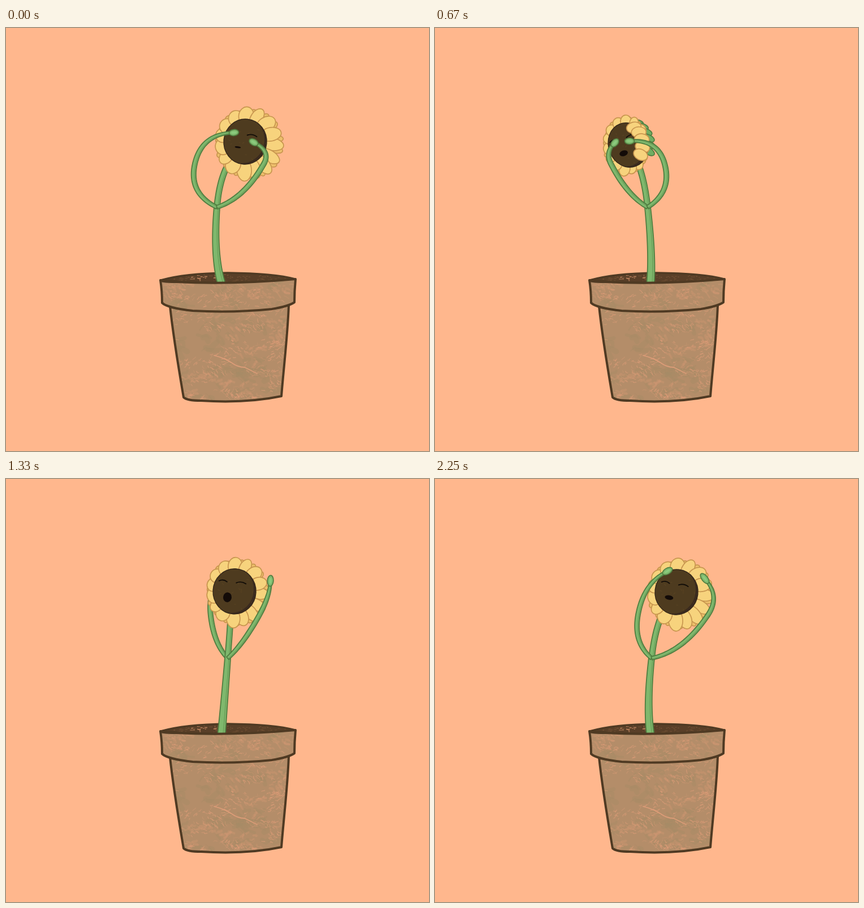
Animation of 748 by 748 pixels, one loop 2.33 s. Source, as an HTML page with a canvas:

```html
<!DOCTYPE html>
<html lang="en">
<head>
<meta charset="utf-8">
<title>Sleepy sunflower</title>
<style>
  html, body { margin: 0; width: 100%; height: 100%; overflow: hidden; background: #ffb78d; }
  canvas { display: block; width: 100vw; height: 100vh; }
</style>
</head>
<body>
<canvas id="stage" width="748" height="748"></canvas>
<script>
const SIZE = 748, LOOP = 2330, FRAMES = 28, DRAWINGS = 25;
const TAU = Math.PI * 2, RAD = Math.PI / 180;
const BASE = [381, 452], JOINT_Y = 317, ELBOW_Y = 240;
const INK = '#4f3a23', GREEN = '#7fb86d', GREEN_INK = '#507d40', PETAL_INK = '#c8964f';
const ctx = document.getElementById('stage').getContext('2d');

// An arm is elbow x, hand x, hand y; everything else follows from these points.
const poses = [
  { at: 0, joint: 373, head: [423, 201], mouth: 1.6, left: [334, 403, 185], right: [456, 438, 202] },
  { at: 5, joint: 378, head: [385, 194], mouth: 4, left: [328, 362, 188], right: [439, 398, 196] },
  { at: 8, joint: 376, head: [341, 207], mouth: 5, left: [311, 318, 203], right: [406, 344, 200] },
  { at: 13, joint: 385, head: [372, 197], mouth: 7, left: [335, 342, 161], right: [416, 394, 162] },
  { at: 18, joint: 405, head: [463, 202], mouth: 12, left: [411, 440, 205], right: [508, 603, 213] },
  { at: 21, joint: 407, head: [455, 199], mouth: 10.5, left: [400, 441, 159], right: [505, 589, 194] },
  { at: 24, joint: 383, head: [427, 200], mouth: 4, left: [359, 411, 163], right: [483, 477, 176] }
];

const clamp = (v, low, high) => Math.max(low, Math.min(high, v));
const mix = (a, b, u) => Array.isArray(a) ? a.map((v, i) => mix(v, b[i], u)) : a + (b - a) * u;

function randomizer(seed) {
  return () => (seed = (seed * 16807) % 2147483647) / 2147483647;
}

function poseAt(step) {
  const i = poses.findLastIndex(p => p.at <= step);
  const from = poses[i], to = poses[(i + 1) % poses.length];
  const t = (step - from.at) / ((to.at || DRAWINGS) - from.at);
  const eased = t * t * (3 - 2 * t), result = {};
  for (const part in from) result[part] = mix(from[part], to[part], eased);
  return result;
}

// The head turns sideways as it swings left, and the petals close up in a yawn.
function headShape({ head: [x, y], mouth }) {
  const turn = clamp((385 - x) / 40, 0, 1), swing = x - 385;
  const bloom = 64 - 18 * turn - .8 * mouth;
  return {
    x, y, turn, mouth,
    rx: 38 - 4 * turn, ry: 40,
    ox: x + 4 + .08 * swing - 4 * turn, oy: y + .1 * swing + 5 * turn,
    orx: bloom, ory: 30 + .57 * bloom,
    tilt: (.15 * swing - 14 * turn) * RAD
  };
}

function oval(x, y, rx, ry, angle, fill, stroke, width = 1.7) {
  ctx.beginPath();
  ctx.ellipse(x, y, rx, ry, angle, 0, TAU);
  if (fill) { ctx.fillStyle = fill; ctx.fill(); }
  if (stroke) { ctx.strokeStyle = stroke; ctx.lineWidth = width; ctx.stroke(); }
}

// Two smooth arcs that meet at `via`, running there parallel to start-end.
function bend(start, via, end) {
  const chord = Math.hypot(end[0] - start[0], end[1] - start[1]);
  const control = (point, sign) => {
    const pull = sign * .62 * Math.hypot(point[0] - via[0], point[1] - via[1]) / chord;
    return via.map((v, i) => v + (end[i] - start[i]) * pull);
  };
  const arc = (a, c, b) => Array.from({ length: 21 }, (_, i) =>
    mix(mix(a, c, i / 20), mix(c, b, i / 20), i / 20));
  return [...arc(start, control(start, -1), via), ...arc(via, control(end, 1), end).slice(1)];
}

function tube(line, widthAt) {
  const last = line.length - 1;
  const edge = (i, sign) => {
    const p = line[Math.max(0, i - 1)], q = line[Math.min(last, i + 1)];
    const dx = q[0] - p[0], dy = q[1] - p[1];
    const r = widthAt(i / last) / 2 * sign / (Math.hypot(dx, dy) || 1);
    return [line[i][0] - dy * r, line[i][1] + dx * r];
  };
  const rail = sign => line.map((_, i) => edge(i, sign));
  ctx.beginPath();
  for (const point of [...rail(1), ...rail(-1).reverse()]) ctx.lineTo(...point);
  ctx.closePath();
  ctx.fillStyle = GREEN;
  ctx.fill();
  ctx.strokeStyle = GREEN_INK;
  ctx.lineWidth = 1.8;
  ctx.stroke();
  ctx.beginPath();
  for (const point of rail(.45)) ctx.lineTo(...point);
  ctx.strokeStyle = 'rgba(80,125,64,.35)';
  ctx.stroke();
}

function drawStem({ joint, head: [x, y] }) {
  const top = [mix(joint, x, .52), y + 30];
  tube(bend(BASE, [joint, JOINT_Y], top), u => 13.5 - 4 * Math.min(1, u * 1.7));
}

function drawArm(joint, [elbow, hx, hy]) {
  const line = bend([joint, JOINT_Y], [elbow, ELBOW_Y], [hx, hy]);
  const reach = Math.hypot(hx - joint, hy - JOINT_Y);
  const width = 10 - .015 * reach;
  tube(line, u => width * (.8 + .35 * Math.sin(u * Math.PI) - .25 * u));
  const [wx, wy] = line[line.length - 4];
  const angle = Math.atan2(hy - wy, hx - wx);
  const length = 8.5 + .07 * Math.max(0, reach - 140), thick = 6.5 - .12 * length;
  oval(hx, hy, length, thick, angle, GREEN, GREEN_INK);
  oval(hx, hy, length * .6, thick * .4, angle, '#8acb7d');
}

function drawPetals({ x, y, rx, ry, ox, oy, orx, ory }) {
  const random = randomizer(77), count = 15;
  const ring = (phase, reach, wide, fill) => {
    for (let i = 0; i < count; i++) {
      const a = (i + phase + random() * .25) / count * TAU;
      const far = reach - random() * .06;
      const bx = x + Math.cos(a) * rx * .75, by = y + Math.sin(a) * ry * .75;
      const tx = ox + Math.cos(a) * orx * far, ty = oy + Math.sin(a) * ory * far;
      oval((bx + tx) / 2, (by + ty) / 2, Math.hypot(tx - bx, ty - by) / 2,
        wide * (.85 + random() * .3) * (orx + ory) / 125,
        Math.atan2(ty - by, tx - bx), fill, PETAL_INK);
    }
  };
  ring(.5, .97, 8, '#edbf6b');
  ring(0, 1.01, 12, '#f7d37d');
}

function drawSepals({ ox, oy, orx, ory, turn }) {
  for (let i = 0; i < 6; i++) {
    const a = (15 * i - 62) * RAD;
    oval(ox + Math.cos(a) * (orx - 1), oy + Math.sin(a) * (ory - 9),
      12 * turn, 6 * turn, a * .3 + .5, '#70ad62', GREEN_INK);
  }
}

function drawFoldedPetals({ x, y, turn }) {
  const out = 44 - 18 * turn;
  for (let i = 0; i < 5; i++) {
    const a = (24 * i - 66) * RAD;
    oval(x + Math.cos(a) * out, y + Math.sin(a) * (out + 8),
      13 * turn, 9.5 * turn, a * .4 + .25, '#f7d37d', PETAL_INK);
  }
}

function drawDisc({ x, y, rx, ry, tilt }) {
  const random = randomizer(31);
  ctx.save();
  oval(x, y, rx, ry, tilt, '#3a2a1e');
  ctx.clip();
  oval(x - 5, y - 3, rx + 1, ry + 1, tilt, '#4e3b1f');
  for (let i = 0; i < 26; i++) {
    oval(x + (random() - .5) * rx * 2, y + (random() - .5) * ry * 2,
      1 + random() * 2, .6, random() * 3, 'rgba(110,82,42,.35)');
  }
  ctx.restore();
  oval(x, y, rx, ry, tilt, null, '#35281a', 1.4);
}

function drawFace({ x, y, tilt, mouth }) {
  const eye = (ex, ey, half) => {
    ctx.beginPath();
    ctx.moveTo(ex - half, ey + 1);
    ctx.quadraticCurveTo(ex, ey - 3, ex + half, ey + 2);
    ctx.strokeStyle = '#120d08';
    ctx.lineWidth = 1.9;
    ctx.stroke();
  };
  ctx.save();
  ctx.translate(x, y);
  ctx.rotate(tilt);
  eye(-21, -14 - mouth / 2, 7);
  eye(11, -12 - mouth / 2, 8.5);
  oval(-12, 11, Math.min(7.5, 3 + 1.5 * mouth), mouth, .05, '#130b08');
  ctx.restore();
}

function makeLayer(draw) {
  const layer = document.createElement('canvas');
  layer.width = layer.height = SIZE;
  const g = layer.getContext('2d');
  g.lineJoin = g.lineCap = 'round';
  draw(g);
  return layer;
}

function textured(g, shape, fill, lineWidth, texture) {
  g.save();
  g.clip(shape);
  g.fillStyle = fill;
  g.fill(shape);
  texture();
  g.restore();
  g.strokeStyle = INK;
  g.lineWidth = lineWidth;
  g.stroke(shape);
}

const pot = makeLayer(g => {
  const random = randomizer(4242);
  const body = new Path2D('M290 492 C296 548 305 600 314 653 Q320 659 345 659 Q425 664 487 651 C491 600 498 545 500 490 Z');
  const rim = new Path2D('M273 446 Q274 449 300 449 Q400 454 512 444 Q510 465 510 485 Q500 492 470 497 Q400 504 330 500 Q285 495 276 486 Q276 465 273 446 Z');

  // Each cluster is a patch of short, wandering scratches.
  const scratches = (clusters, perCluster, color, reach, width) => {
    g.strokeStyle = color;
    for (let c = 0; c < clusters; c++) {
      const cx = 270 + random() * 245, cy = 445 + random() * 215, lean = random() - .4;
      for (let i = 0; i < perCluster; i++) {
        let x = cx + (random() + random() - 1) * 28, y = cy + (random() + random() - 1) * 10;
        g.lineWidth = .5 + random() * width;
        g.beginPath();
        g.moveTo(x, y);
        for (let n = 0; n < 3; n++) {
          x += random() * reach;
          y += (lean + random() - .5) * reach;
          g.lineTo(x, y);
        }
        g.stroke();
      }
    }
  };
  const clay = shape => textured(g, shape, '#b48d69', 4, () => {
    scratches(40, 3, 'rgba(164,138,100,.35)', 9, 10);
    scratches(50, 6, 'rgba(214,153,117,.3)', 4, 4);
    scratches(55, 9, 'rgba(228,158,122,.55)', 3, 1);
  });
  clay(body);
  g.lineWidth = 1.8;
  g.strokeStyle = 'rgba(232,160,124,.8)';
  g.stroke(new Path2D('M368 579 Q388 584 399 592 T422 600 L444 611'));
  clay(rim);
});

const soil = makeLayer(g => {
  const random = randomizer(909);
  const shape = new Path2D('M274 446 Q315 434 392 433 Q475 434 511 444 Q400 456 274 446 Z');
  textured(g, shape, '#593f28', 3.4, () => {
    for (let i = 0; i < 150; i++) {
      const x = 280 + random() * 225, y = 434 + random() * 16;
      const light = Math.abs(x - 348) < 24 && random() < .65;
      g.fillStyle = light ? 'rgba(215,150,110,.65)' : 'rgba(130,92,60,.5)';
      g.fillRect(x, y, 1 + random() * 5, 1 + random());
    }
  });
});

function drawScene(step) {
  const pose = poseAt(step), head = headShape(pose);
  const leftBehind = step >= 15 && step <= 20;
  ctx.fillStyle = '#ffb78d';
  ctx.fillRect(0, 0, SIZE, SIZE);
  ctx.drawImage(soil, 0, 0);
  if (leftBehind) drawArm(pose.joint, pose.left);
  drawStem(pose);
  if (head.turn) drawSepals(head);
  drawPetals(head);
  drawDisc(head);
  drawFace(head);
  if (head.turn) drawFoldedPetals(head);
  if (!leftBehind) drawArm(pose.joint, pose.left);
  drawArm(pose.joint, pose.right);
  ctx.drawImage(pot, 0, 0);
}

// Twelve drawings a second, with one held for two frames and one for three.
function stepAt(time) {
  const frame = Math.floor((time % LOOP + 3.5) * FRAMES / LOOP) % FRAMES;
  return frame - (frame > 10 ? 1 : 0) - clamp(frame - 21, 0, 2);
}

function tick() {
  drawScene(stepAt(performance.now()));
  requestAnimationFrame(tick);
}
ctx.lineJoin = ctx.lineCap = 'round';
tick();
</script>
</body>
</html>
```
